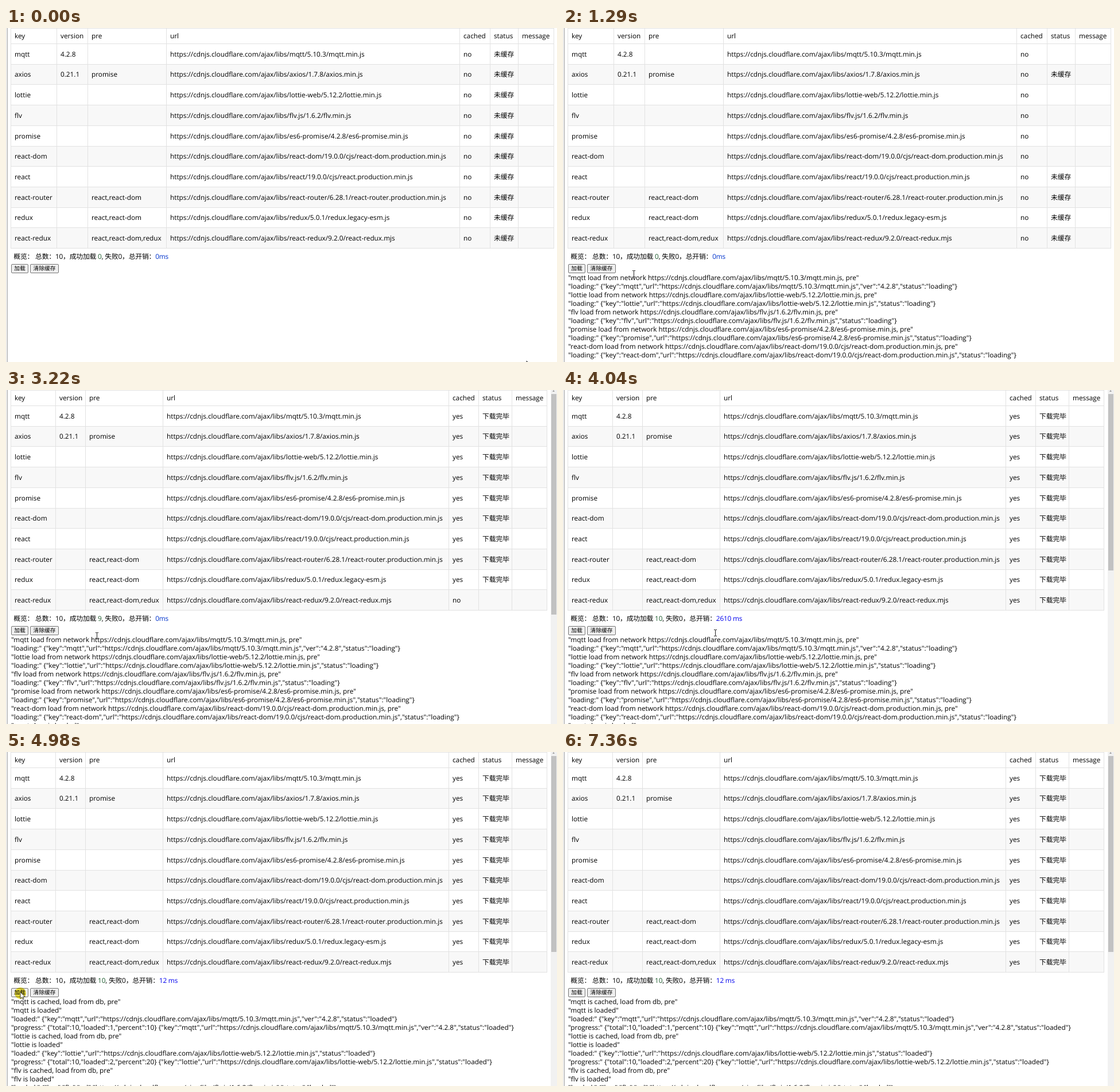
An HTML page that plays this animation: 960x583 px, repeating every 7430 ms.

```html
<!DOCTYPE html>
<html lang="zh-CN">
<head>
<meta charset="utf-8">
<title>Script loader</title>
<style>
html, body { margin: 0; width: 100%; height: 100%; overflow: hidden; background: #fff; }
#stage {
  position: relative; width: 960px; height: 583px; overflow: hidden; background: #fff; color: #000;
  font: 11.79px/15px "Open Sans", "Noto Sans CJK SC", "Noto Sans CJK JP", sans-serif;
  text-rendering: geometricPrecision; white-space: pre;
}
#stage div, #stage svg { position: absolute; }
#edge { left: 0; top: 0; width: 2px; height: 583px; background: #ececec; border-right: 1px solid #a8a8a8; }
#table { left: 0; top: 0; }
.row { left: 8px; box-sizing: border-box; border-bottom: 1px solid #e2e2e2; }
.col { top: 0; height: 385px; border-left: 1px solid #e2e2e2; }
.cell { left: 6px; }
#summary { left: 13.3px; top: 392px; letter-spacing: -0.16px; }
#count { color: #1c5a2c; }
.button {
  top: 412px; height: 16px; box-sizing: border-box; border: 1px solid #767676; border-radius: 2px;
  background: #efefef; font-size: 9.75px; line-height: 14px; text-align: center; color: #000;
}
#log { left: 9px; top: 429px; }
#bar { left: 949px; top: 0; width: 11px; height: 583px; background: #f1f1f1; }
#arrowUp { left: 3px; top: 0; border: 2.5px solid transparent; border-top: 0; border-bottom: 3px solid #a0a0a0; }
#thumb { left: 1px; top: 7px; width: 9px; background: #c1c1c1; }
#halo { left: 15px; top: 411px; width: 20px; height: 20px; border-radius: 50%; background: #f3e63c; mix-blend-mode: multiply; }
#arrow, #beam { left: 0; top: 0; overflow: visible; }
</style>
</head>
<body>
<div id="stage">
  <div id="edge"></div>
  <div id="table"></div>
  <div id="summary">概览： 总数：10，成功加载 <span id="count">0</span>, 失败0，总开销：<span id="cost">0ms</span></div>
  <div class="button" style="left:9px;width:30px">加载</div>
  <div class="button" style="left:42px;width:50px">清除缓存</div>
  <div id="log"></div>
  <div id="bar"><div id="arrowUp"></div><div id="thumb"></div></div>
  <div id="halo"></div>
  <svg id="arrow" width="10" height="15"><path d="M0 0V11.5L2.7 9 4.4 13 6.2 12.2 4.5 8.4H8.2Z" fill="#fff" stroke="#222" stroke-width=".9"/></svg>
  <svg id="beam" width="8" height="12"><path d="M-2.5-5.5H-.5L0-5 .5-5.5H2.5M0-5V5M-2.5 5.5H-.5L0 5 .5 5.5H2.5" fill="none" stroke="#222"/></svg>
</div>
<script>
const LOOP = 7430, CLICK = 960, DONE = 3490, RELOAD = 4980;
const $ = id => document.getElementById(id);

// key, version, pre, path, time loading starts, time loaded, scroll thumb end after loading
const libs = [
  ['mqtt', '4.2.8', '', 'mqtt/5.10.3/mqtt.min.js', CLICK, 2460, 458],
  ['axios', '0.21.1', 'promise', 'axios/1.7.8/axios.min.js', 2010, 2580, 434],
  ['lottie', '', '', 'lottie-web/5.12.2/lottie.min.js', CLICK, 2350, 486],
  ['flv', '', '', 'flv.js/1.6.2/flv.min.js', CLICK, 1710, 546],
  ['promise', '', '', 'es6-promise/4.2.8/es6-promise.min.js', CLICK, 1860, 531],
  ['react-dom', '', '', 'react-dom/19.0.0/cjs/react-dom.production.min.js', CLICK, 1560, 561],
  ['react', '', '', 'react/19.0.0/cjs/react.production.min.js', 1560, 2010, 517],
  ['react-router', '', 'react,react-dom', 'react-router/6.28.1/react-router.production.min.js', 1710, 2690, 412],
  ['redux', '', 'react,react-dom', 'redux/5.0.1/redux.legacy-esm.js', 1860, 2800, 392],
  ['react-redux', '', 'react,react-dom,redux', 'react-redux/9.2.0/react-redux.mjs', 2800, DONE, 315]
].map(([key, ver, pre, path, start, end, thumb]) =>
  ({ key, ver, pre, url: 'https://cdnjs.cloudflare.com/ajax/libs/' + path, start, end, thumb }));

const heads = ['key', 'version', 'pre', 'url', 'cached', 'status', 'message'];
const wide = [8, 88, 142, 279, 790, 843, 892, 954];
const narrow = [8, 86, 138, 273, 771, 823, 881, 942];

// Cursor stops: time, x, y
const path = [
  [0, 907, 581], [70, 890, 574], [300, 560, 500], [540, 180, 438], [750, 30, 421], [820, 25, 419],
  [1020, 25, 419], [1150, 70, 425], [1290, 123, 429], [1490, 123, 429], [2090, 125, 429],
  [2350, 126, 429], [2800, 154, 429], [3150, 154, 429], [3220, 158, 429], [3560, 240, 433],
  [3900, 294, 428], [3970, 292, 425], [4350, 150, 418], [4710, 25, 419], [5050, 25, 419],
  [5250, 34, 418], [5500, 150, 415], [5730, 269, 409], [5940, 286, 395], [6010, 286, 395]
];

function add(parent, cls, text = '') {
  const el = document.createElement('div');
  el.className = cls;
  el.textContent = text;
  parent.append(el);
  return el;
}

function place(el, box) {
  for (const k in box) el.style[k] = box[k] + 'px';
}

const lineY = i => i < 0 ? 0 : Math.round(27 + 35.72 * i);
const rows = [...Array(11).keys()].map(i => {
  const el = add($('table'), 'row');
  place(el, { top: lineY(i - 1) + (i ? 1 : 0), height: lineY(i) - lineY(i - 1) + (i ? 0 : 1) });
  el.style.background = i && i % 2 === 0 ? '#f8f8f8' : '#fff';
  if (!i) el.style.borderTop = '1px solid #e2e2e2';
  return el;
});
const cols = [...heads, ''].map(() => add($('table'), 'col'));
const cells = heads.map((head, c) => [head, ...libs.map(l => [l.key, l.ver, l.pre, l.url, '', '', ''][c])]
  .map((text, i) => {
    const el = add(cols[c], 'cell', text);
    place(el, { top: Math.round((lineY(i - 1) + lineY(i)) / 2 - 6.5) });
    return el;
  }));

function info(lib, status) {
  const item = { key: lib.key, url: lib.url };
  if (lib.ver) item.ver = lib.ver;
  return JSON.stringify({ ...item, status });
}

const networkLog = [0, 2, 3, 4, 5].flatMap(i => [
  `"${libs[i].key} load from network ${libs[i].url}, pre"`,
  `"loading:" ${info(libs[i], 'loading')}`
]);
const cacheLog = [0, 2, 3].flatMap((i, n) => [
  `"${libs[i].key} is cached, load from db, pre"`,
  `"${libs[i].key} is loaded"`,
  `"loaded:" ${info(libs[i], 'loaded')}`,
  `"progress:" ${JSON.stringify({ total: 10, loaded: n + 1, percent: 10 * n + 10 })} ${info(libs[i], 'loaded')}`
]);

function logText(t) {
  if (t < CLICK) return '';
  if (t >= RELOAD) return cacheLog.join('\n');
  return [...networkLog, ...(t >= 1560 ? ['"react-dom is loaded"'] : [])].join('\n');
}

function setText(el, text) {
  if (el.textContent !== text) el.textContent = text;
}

function show(el, on) {
  el.style.display = on ? '' : 'none';
}

function drawCursor(t) {
  const n = path.findIndex(p => p[0] > t);
  show($('arrow'), false);
  show($('beam'), false);
  if (n < 0) return;
  const [t0, x0, y0] = path[n - 1], [t1, x1, y1] = path[n];
  const k = (t - t0) / (t1 - t0);
  const x = x0 + (x1 - x0) * k, y = y0 + (y1 - y0) * k;
  const overText = t > CLICK && t < RELOAD && x > 95;
  const el = $(overText ? 'beam' : 'arrow');
  show(el, true);
  el.style.transform = `translate(${Math.round(x) + (overText ? .5 : 0)}px, ${Math.round(y)}px)`;
}

function draw(t) {
  const loaded = libs.filter(l => t >= l.end);
  const edges = loaded.length ? narrow : wide;
  cols.forEach((el, i) => place(el, { left: edges[i] }));
  rows.forEach(el => place(el, { width: edges[7] - 7 }));
  libs.forEach((l, i) => {
    setText(cells[4][i + 1], t >= l.end ? 'yes' : 'no');
    setText(cells[5][i + 1], t >= l.end ? '下载完毕' : t >= l.start ? '' : '未缓存');
  });
  setText($('count'), String(loaded.length));
  setText($('cost'), t >= RELOAD ? '12 ms' : t >= DONE ? '2610 ms' : '0ms');
  $('cost').style.color = t >= DONE ? '#0000ee' : '#0033cc';
  setText($('log'), logText(t));
  show($('bar'), loaded.length);
  const end = t >= RELOAD ? 349 : Math.min(...loaded.map(l => l.thumb), 583);
  place($('thumb'), { height: end - 7 });
  show($('halo'), (t >= 890 && t < 1030) || (t >= 4910 && t < 5050));
  drawCursor(t);
}

const begin = performance.now();
function tick() {
  draw((performance.now() - begin) % LOOP);
  requestAnimationFrame(tick);
}
tick();
</script>
</body>
</html>
```
